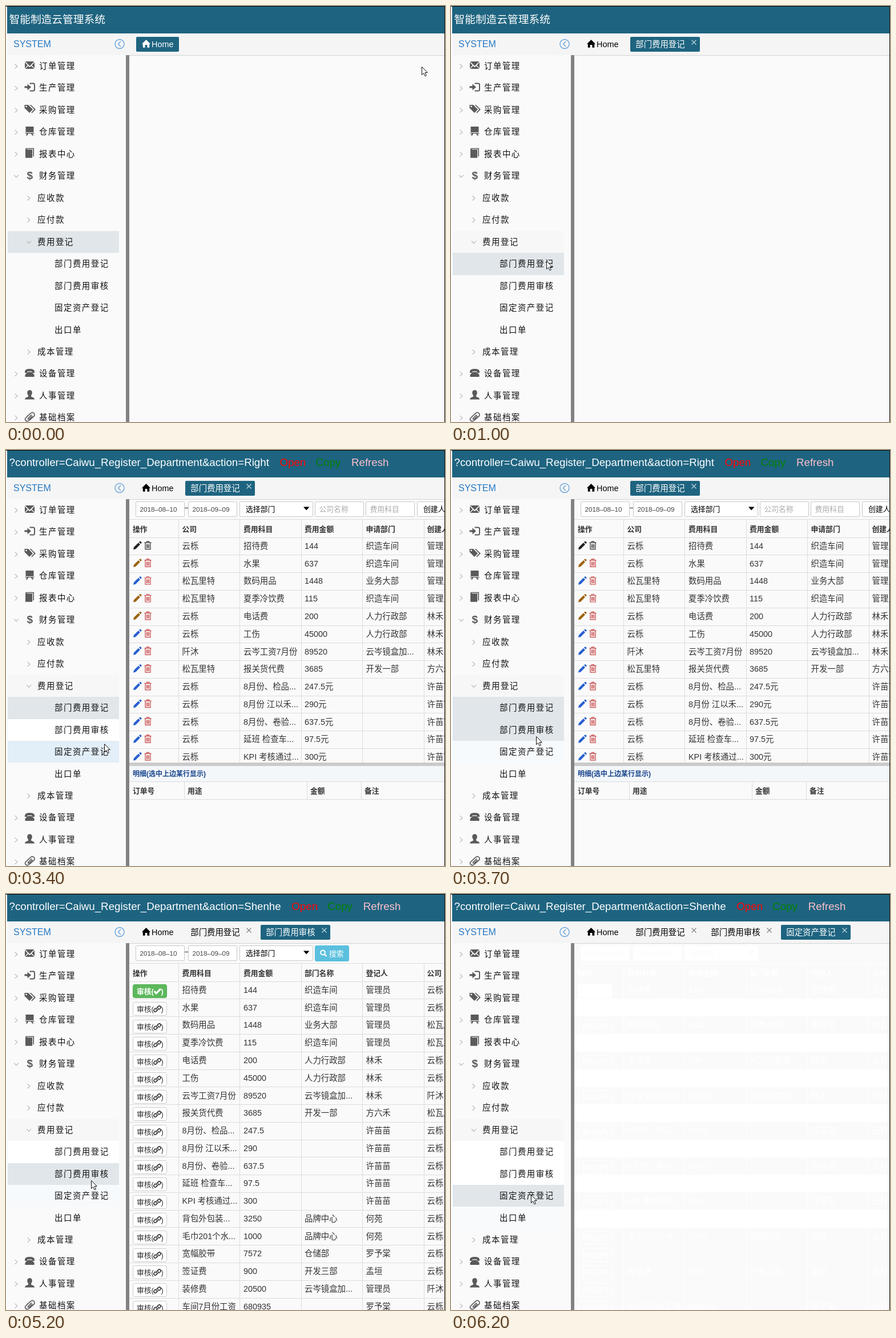
Recreate the animation shown at these times as an HTML page with a canvas. Size 769 px wide and 728 px high, loop 8 s.

```html
<!DOCTYPE html>
<html lang="zh">
<head>
<meta charset="utf-8">
<style>
html, body { margin: 0; width: 100%; height: 100%; overflow: hidden; background: #fafafa; }
canvas { display: block; }
</style>
</head>
<body>
<canvas id="stage" width="769" height="728"></canvas>
<script>
const g = document.getElementById('stage').getContext('2d');
const LOOP = 8000, TEAL = '#1e6480', PAGE = '#fafafa', LINE = '#dcdcdc';
const FONT = '"Liberation Sans", "Noto Sans CJK SC", "Noto Sans CJK", sans-serif';

function box(x, y, w, h, c) { g.fillStyle = c; g.fillRect(x, y, w, h); }

function text(s, x, y, size, c, bold, gap) {
  g.font = (bold ? 'bold ' : '') + size + 'px ' + FONT;
  g.letterSpacing = (gap || 0) + 'px';
  g.fillStyle = c;
  g.fillText(s, x, Math.round(y));
}

function round(x, y, w, h, r, fill, edge) {
  g.beginPath();
  g.roundRect(x, y, w, h, r);
  if (fill) { g.fillStyle = fill; g.fill(); }
  if (edge) { g.strokeStyle = edge; g.lineWidth = 1; g.stroke(); }
}

// Icons are centred on 0,0: [filled path, stroked path, stroke width]
const ICONS = {
  mail: ['M-8-6.5H8L0 1.5zM-8.5-5L-3.7 .3-8.5 5.5zM8.5-5L3.7 .3 8.5 5.5zM-8 6.5L-2.7 1.4 0 3.8 2.7 1.4 8 6.5z'],
  login: ['M-9-1.6h5v-4L2.5 0-4 5.6v-4h-5z', 'M0-6.5h6q2.5 0 2.5 2.5v8q0 2.5-2.5 2.5H0', 2],
  tags: ['M-9-7.5h6.5L5.5 .5-.5 6.5-9-2zM-6-6a1.4 1.4 0 1 0 .1 0zM0-7.5h2.2L10.5 .5 4 7 2.8 5.8 8 .5z'],
  board: ['M-7-8H7V2H-7zM-8 3H8v1.4H-8zM-7 7.5h3L-2.5 4.4h-2.5zM7 7.5H4L2.5 4.4H5z'],
  book: ['M-7.5-6.5q0-2 2-2h13V6h-1.6V-7H-5v1H4.6V8.5H-7.5z'],
  phone: ['M-8.5-2q0-5 8.5-5t8.5 5v2H4v-2.6H-4V0h-4.5zM-3-1.5H3L8 3v4H-8V3z'],
  user: ['M-8.5 8q0-3 4-4l2-1q.5-1.5-.5-2.5Q-5-3-4-6q1-2.5 4-2.5t4 2.5q1 3-1 6.5-1 1-.5 2.5l2 1q4 1 4 4z'],
  clip: ['', 'M-3.5 3.5L3.5-3.5M-6 1L1.5-6Q5-9 7.5-6T6.5 0L-1 6.5Q-4.5 9-7 6.5T-6 1M-3.5 3.5Q-2 5 0 3.5L5-1.5', 1.6],
  home: ['M0-7.5L8 .5H6V7H2V2H-2V7H-6V.5H-8z'],
  pencil: ['M-7 7l1-4.2L2-5 5-2-2.8 6zM3-6l1.3-1.2q1-.7 2 .2l.9.9q.8 1 0 1.9L6-3z'],
  trash: ['', 'M-6-4.5H6M-2-4.5v-2H2v2M-4.5-4.5V7h9V-4.5M-2-2V5M0-2V5M2-2V5', 1.2],
  link: ['', 'M-1.6 1.8Q-2.4 0-.8-1.6L1.8-4.4Q3.8-6 5.4-4.4T5.2-.8L3 1.4M1.6-1.8Q2.4 0 .8 1.6L-1.8 4.4Q-3.8 6-5.4 4.4T-5.2 .8L-3-1.4', 1.6],
  check: ['', 'M-5.5 0L-1.8 3.7 6-4', 3.2],
  search: ['', 'M-1-5a4 4 0 1 0 .1 0zM2 2L5.5 5.5', 2],
  right: ['', 'M-2.5-4L2 0-2.5 4', 1.1],
  down: ['', 'M-4-2L0 2.2 4-2', 1.1],
  cross: ['', 'M-4-4L4 4M4-4L-4 4', 1.4]
};

function icon(name, x, y, c, k = 1) {
  const [fill, edge, w] = ICONS[name];
  g.save();
  g.translate(x, y);
  g.scale(k, k);
  g.fillStyle = g.strokeStyle = c;
  if (fill) g.fill(new Path2D(fill), 'evenodd');
  if (edge) { g.lineWidth = w; g.stroke(new Path2D(edge)); }
  g.restore();
}

// Sidebar: [level, label, icon, open]
const MENU = [
  [1, '订单管理', 'mail'], [1, '生产管理', 'login'], [1, '采购管理', 'tags'],
  [1, '仓库管理', 'board'], [1, '报表中心', 'book'], [1, '财务管理', '$', true],
  [2, '应收款'], [2, '应付款'], [2, '费用登记', '', true],
  [3, '部门费用登记'], [3, '部门费用审核'], [3, '固定资产登记'], [3, '出口单'],
  [2, '成本管理'], [1, '设备管理', 'phone'], [1, '人事管理', 'user'], [1, '基础档案', 'clip']
];
const ROW = 38.46, TOP = 85.9;

// Row backgrounds: [row, from, to, colour]
const SEL = '#e0e6e9';
const SHADES = [
  [8, 0, 1000, SEL], [8, 1000, LOOP, '#f7f7f7'],
  [9, 700, 3900, SEL], [9, 3900, LOOP, '#fff'],
  [10, 3200, 3700, '#fff'], [10, 3700, 6200, SEL], [10, 6200, LOOP, '#fff'],
  [11, 3500, 6100, '#f7fafd'], [11, 6100, LOOP, SEL],
  [12, 6200, LOOP, '#f8fafc']
];

function sidebar(t, cur) {
  const shade = {};
  for (const [row, from, to, c] of SHADES) if (t >= from && t < to) shade[row] = c;
  const over = cur[0] < 198 ? Math.floor((cur[1] - TOP) / ROW) : -1;
  if (over >= 0 && shade[over] !== SEL) shade[over] = '#e2eef8';
  for (const r in shade) {
    const y = Math.round(TOP + r * ROW);
    box(3, y, 195, Math.round(TOP + (+r + 1) * ROW) - y, shade[r]);
  }
  MENU.forEach(([level, label, pic, open], i) => {
    const y = 104.5 + i * ROW;
    if (level < 3) icon(open ? 'down' : 'right', level === 1 ? 18 : 40, y + 1, '#b5b5b5');
    if (pic === '$') text('$', 36.5, y + 6, 19, '#5a5a5a', true);
    else if (pic) icon(pic, 41.5, y - 1, '#5a5a5a');
    text(label, [58, 55, 85][level - 1], y + 5.5, 14.4, '#111', false, 1.55);
  });
}

// [company, subject, amount, department, person]
const A = '云栎', B = '松瓦里特', C = '阡沐';
const ADMIN = '管理员', XU = '许苗苗', LIN = '林禾', HE = '何苑', LUO = '罗予棠', WEAVE = '织造车间';
const DATA = [
  [A, '招待费', '144', WEAVE, ADMIN], [A, '水果', '637', WEAVE, ADMIN],
  [B, '数码用品', '1448', '业务大部', ADMIN], [B, '夏季冷饮费', '115', WEAVE, ADMIN],
  [A, '电话费', '200', '人力行政部', LIN], [A, '工伤', '45000', '人力行政部', LIN],
  [C, '云岑工资7月份', '89520', '云岑镜盒加...', LIN], [B, '报关货代费', '3685', '开发一部', '方六禾'],
  [A, '8月份、检品...', '247.5', '', XU], [A, '8月份 江以禾...', '290', '', XU],
  [A, '8月份、卷验...', '637.5', '', XU], [A, '延班 检查车...', '97.5', '', XU],
  [A, 'KPI 考核通过...', '300', '', XU], [A, '背包外包装...', '3250', '品牌中心', HE],
  [A, '毛巾201个水...', '1000', '品牌中心', HE], [A, '宽幅胶带', '7572', '仓储部', LUO],
  [A, '签证费', '900', '开发三部', '孟垣'], [C, '装修费', '20500', '云岑镜盒加...', ADMIN],
  [A, '车间7月份工资', '680935', '', LUO]
];
const COLS = [222, 308.5, 416, 523, 630.5, 737.5];
const RULES = [302, 409, 517, 624, 732];

function field(x, w, label, c, ghost, size = 12.8) {
  round(x + .5, 90.5, w, 26, 1, '#fff', ghost ? null : '#c9c9c9');
  text(label, x + 7.5, 108, size, ghost ? PAGE : c);
}

function toolbar(audit, ghost) {
  field(227, 85, '2018–08–10', '#444', ghost, 11.7);
  field(319, 85, '2018–09–09', '#444', ghost, 11.7);
  field(409, 128, ' 选择部门', '#000', ghost);
  g.fillStyle = ghost ? PAGE : '#000';
  g.fill(new Path2D('M521 99.5h10.5L526.2 105.5z'));
  if (!ghost) box(313, 101, 6, 1, '#333');
  if (!audit) {
    field(541, 85, '公司名称', '#aaa', ghost);
    field(630, 85, '费用科目', '#aaa', ghost);
    field(720, 85, ' 创建人', '#000', ghost);
  } else if (!ghost) {
    round(541, 90, 60, 28, 3, '#5bc0de');
    icon('search', 556, 103.5, '#fff');
    text('搜索', 566, 108.5, 12.8, '#fff');
  }
}

function auditButton(y, done, ghost) {
  const ink = ghost || done ? '#fff' : '#333';
  const fill = ghost ? (done ? '#fff' : null) : done ? '#5cb85c' : '#fff';
  round(222.5, y - 11.5, 59, 23, 3, fill, ghost ? '#fff' : done ? '#4cae4c' : '#ccc');
  text('审核(', 229, y + 5, 12.8, ink, done);
  icon(done ? 'check' : 'link', 265, y, ink);
  text(')', 271.5, y + 5, 12.8, ink, done);
}

function detail(ghost) {
  const ink = c => ghost ? '#fff' : c;
  box(216, 547, 552, 6, ink('#cbcbcb'));
  box(216, 553, 552, 27, ink('#f4f7fa'));
  box(216, 580, 552, 1, ink(LINE));
  box(216, 611, 552, 1, ink(LINE));
  if (!ghost) text('明细(选中上边某行显示)', 222, 570.5, 12, '#15428b', true);
  for (const x of [312, 527, 622]) box(x, 581, 1, 30, ink(LINE));
  [['订单号', 222], ['用途', 318], ['金额', 533], ['备注', 628]]
    .forEach(([s, x]) => text(s, x, 601.4, 12.8, ink('#333'), true));
}

function table(audit, ghost) {
  const ink = c => ghost ? '#fff' : c;
  const heads = audit ? ['操作', '费用科目', '费用金额', '部门名称', '登记人', '公司']
    : ['操作', '公司', '费用科目', '费用金额', '申请部门', '创建人'];
  const end = audit ? 728 : 547;
  g.save();
  g.beginPath();
  g.rect(216, 87, 552, end - 87);
  g.clip();
  toolbar(audit, ghost);
  box(216, 121, 552, 1, ink(LINE));
  heads.forEach((h, i) => text(h, COLS[i], 143.4, 12.8, ink('#333'), true));
  DATA.slice(0, audit ? 19 : 13).forEach(([firm, subject, sum, dept, who], i) => {
    const y = 167.7 + i * 30.77, top = Math.round(y - 15), odd = i % 2;
    if (!ghost) box(216, top, 552, 1, LINE);
    else if (odd && i < 14) box(216, top, 552, 31, '#fff');
    if (audit) auditButton(Math.round(y + 2.3), i === 0, ghost);
    else {
      icon('pencil', 230, y - .5, ink(i === 0 ? '#222' : i === 1 || i === 3 || i === 4 ? '#9c6410' : '#2860d0'));
      icon('trash', 248.5, y - 1, ink(i ? '#c64545' : '#333'));
    }
    if (ghost && odd) return;
    const cells = audit ? [subject, sum, dept, who, firm]
      : [firm, subject, sum + (i > 7 ? '元' : ''), dept, who];
    cells.forEach((s, k) => text(s, COLS[k + 1], y + 5.2, 14.4, ink('#333')));
  });
  for (const x of RULES) box(x, 122, 1, end - 122, ink(LINE));
  g.restore();
  if (!audit) detail(ghost);
}

const TABS = ['部门费用登记', '部门费用审核', '固定资产登记'];

function tabs(n) {
  if (!n) round(228, 54, 75, 26, 2, TEAL);
  icon('home', 245.5, 66, n ? '#000' : '#fff', .95);
  text('Home', 255, 71.5, 14.4, n ? '#000' : '#fff');
  for (let i = 0; i < n; i++) {
    const x = Math.round(314 + i * 131.8), on = i === n - 1;
    if (on) round(x, 54, 122, 26, 2, TEAL);
    text(TABS[i], x + 9.3, 72, 14.4, on ? '#fff' : '#000');
    icon('cross', x + 111.5, 63.5, on ? '#b9d0da' : '#8a8a8a');
  }
}

function header(t) {
  box(0, 0, 769, 48, TEAL);
  box(0, 0, 769, 1, '#000');
  if (t < 2700) return text('智能制造云管理系统', 5.5, 30.4, 18.72, '#fff');
  const later = t >= 5200, dx = later ? 20.8 : 0;
  text('?controller=Caiwu_Register_Department&action=' + (later ? 'Shenhe' : 'Right'), 5.5, 28, 18.72, '#fff');
  text('Open', 479.5 + dx, 28, 18.72, '#f00');
  text('Copy', 542.5 + dx, 28, 18.72, '#008000');
  text('Refresh', 605 + dx, 28, 18.72, '#ffc0cb');
}

// Pointer path: [time, x, y]
const PATH = [
  [0, 728, 106], [700, 167, 446], [2900, 167, 446], [3000, 172, 456], [3100, 190, 478],
  [3200, 212, 508], [3300, 196, 540], [3400, 172, 514], [3700, 149, 501],
  [5600, 149, 501], [6000, 140, 526], [LOOP, 140, 526]
];

function pointerAt(t) {
  const i = PATH.findIndex(p => p[0] > t);
  const [t0, x0, y0] = PATH[i - 1], [t1, x1, y1] = PATH[i];
  let u = (t - t0) / (t1 - t0);
  u = u * u * (3 - 2 * u);
  return [x0 + (x1 - x0) * u, y0 + (y1 - y0) * u];
}

function pointer([x, y]) {
  g.save();
  g.translate(Math.round(x) + .5, Math.round(y) + .5);
  const p = new Path2D('M0 0V14L3.2 11 5.5 16.2 7.8 15.2 5.6 10H9.8z');
  g.fillStyle = '#fff';
  g.fill(p);
  g.strokeStyle = '#111';
  g.lineWidth = 1;
  g.stroke(p);
  g.restore();
}

function draw(now) {
  const t = Math.floor(now % LOOP / 100) * 100;
  const cur = pointerAt(t);
  box(0, 0, 769, 728, PAGE);
  header(t);
  box(0, 48, 769, 38, '#f5f5f5');
  box(216, 86, 553, 1, '#d4d4d4');
  text('SYSTEM', 13, 72.4, 16, '#2779c4');
  g.beginPath();
  g.arc(199, 66.5, 8, 0, 7);
  g.strokeStyle = '#6ea6dc';
  g.lineWidth = 1.5;
  g.stroke();
  g.stroke(new Path2D('M201 62L196.5 66.5 201 71'));
  tabs(t < 1000 ? 0 : t < 3900 ? 1 : t < 6200 ? 2 : 3);
  sidebar(t, cur);
  box(210, 86, 6, 642, '#828282');
  if (t >= 2700) table(t >= 5200, t >= 6200 || (t >= 3900 && t < 5200));
  box(0, 1, 2, 727, '#fff');
  box(768, 0, 1, 728, '#111');
  pointer(cur);
}

const start = performance.now();
function tick() {
  draw(performance.now() - start);
  requestAnimationFrame(tick);
}
tick();
</script>
</body>
</html>
```
